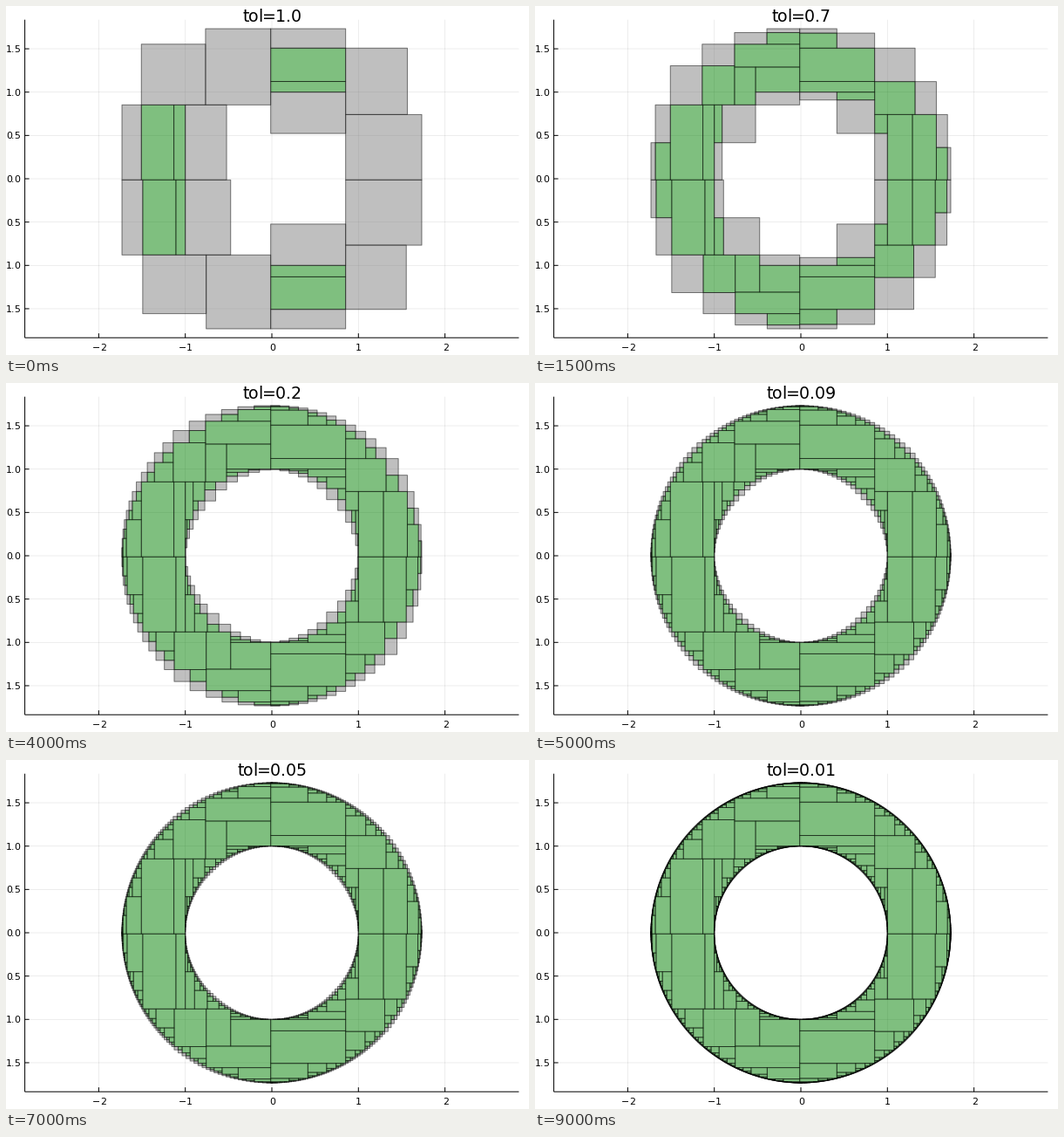
Write a matplotlib script that moves like this. It is 600x400 px and loops after 9.5 s.

```python
import math

import matplotlib.pyplot as plt
from matplotlib.animation import FuncAnimation
from matplotlib.collections import LineCollection, PolyCollection
from matplotlib.textpath import TextPath

W, H, DPI = 600, 400, 100
PX = 72 / DPI                      # one pixel in points
CX, CY, SCALE = 305, 198, 99.3     # centre of the plot and pixels per unit
LEFT, RIGHT, TOP, BOTTOM = 21.6, 588.4, 15.7, 380.2
R2_MIN, R2_MAX = 1, 3              # the ring 1 <= x^2 + y^2 <= 3
SPLIT = 127 / 256                  # bisection point of a box
TINY = 1e-7
GREEN, GRAY = (0, 0.5, 0, 0.5), (0.5, 0.5, 0.5, 0.5)

TOLS = [k / 10 for k in range(10, 0, -1)] + [k / 100 for k in range(9, 0, -1)]


# ---- interval paving of the ring; a box is (x interval, y interval) ----

def square(v):
    a, b = v[0] ** 2, v[1] ** 2
    return (0 if v[0] <= 0 <= v[1] else min(a, b)), max(a, b)


def root(v, lo, hi):
    """Hull of the part of v whose square lies in [lo, hi]."""
    if hi < 0 or lo > hi:
        return None
    a, b = math.sqrt(max(lo, 0)), math.sqrt(hi)
    parts = [(max(v[0], p), min(v[1], q)) for p, q in ((-b, -a), (a, b))]
    parts = [p for p in parts if p[0] <= p[1]]
    if not parts:
        return None
    return min(p[0] for p in parts), max(p[1] for p in parts)


def contract(box, lo, hi):
    """Shrink the box around the points with lo <= x^2 + y^2 <= hi."""
    x, y = box
    (xl, xh), (yl, yh) = square(x), square(y)
    lo, hi = max(lo, xl + yl), min(hi, xh + yh)
    if lo > hi:
        return None
    x, y = root(x, lo - yh, hi - yl), root(y, lo - xh, hi - xl)
    return (x, y) if x and y else None


def hull(a, b):
    if not a or not b:
        return a or b
    return tuple((min(u[0], v[0]), max(u[1], v[1])) for u, v in zip(a, b))


def intersect(a, b):
    if not a or not b:
        return None
    c = tuple((max(u[0], v[0]), min(u[1], v[1])) for u, v in zip(a, b))
    return c if all(v[0] <= v[1] for v in c) else None


def size(v):
    return v[1] - v[0]


def difference(box, cut):
    """Pieces of box outside cut: full-height x strips first, then y strips."""
    if not cut:
        return [box]
    (x, y), (cx, cy) = box, cut
    pieces = [((x[0], cx[0]), y), ((cx[1], x[1]), y),
              (cx, (y[0], cy[0])), (cx, (cy[1], y[1]))]
    return [p for p in pieces if size(p[0]) > TINY and size(p[1]) > TINY]


def bisect(box):
    x, y = box
    gap = size(x) - size(y)
    if gap > 1e-9 or (abs(gap) <= 1e-9 and x[1] > 0):
        m = x[0] + SPLIT * size(x)
        return [((x[0], m), y), ((m, x[1]), y)]
    m = y[0] + SPLIT * size(y)
    return [(x, (y[0], m)), (x, (m, y[1]))]


def pave(tol):
    inside, edge = [], []
    work = [((-2, 2), (-2, 2))]
    while work:
        box = work.pop()
        inner = contract(box, R2_MIN, R2_MAX)
        outer = hull(contract(box, -math.inf, R2_MIN),
                     contract(box, R2_MAX, math.inf))
        inside += difference(box, outer)
        rest = intersect(inner, outer)
        if not rest:
            continue
        widest = max(map(size, rest))
        if widest >= tol:
            work += bisect(rest)
        elif widest > TINY:
            edge.append(rest)
    return inside, edge


# ---- drawing ----

def px(x):
    return CX + SCALE * x


def py(y):
    return CY - SCALE * y


def corners(box):
    (x0, x1), (y0, y1) = box
    return [(px(x0), py(y0)), (px(x1), py(y0)),
            (px(x1), py(y1)), (px(x0), py(y1))]


def advance(char, em):
    """Whole-pixel pen advance of a glyph."""
    end = [TextPath((0, 0), s, size=100).get_extents().x1
           for s in (char + "|", "|")]
    return math.floor((end[0] - end[1]) * em / 100)


def label(s, x, y, em, align=0.5):
    """Set s glyph by glyph on whole pixels, baseline at y."""
    steps = [advance(c, em) for c in s]
    pen = round(x - align * sum(steps))
    glyphs = []
    for c, step in zip(s, steps):
        glyphs.append(ax.text(pen, y, c, fontsize=em * PX, family="DejaVu Sans",
                              color="black", va="baseline", ha="left"))
        pen += step
    return glyphs


def lines(segments, width, **style):
    ax.add_collection(LineCollection(segments, linewidths=width * PX,
                                     snap=False, **style))


fig = plt.figure(figsize=(W / DPI, H / DPI), dpi=DPI, facecolor="white")
ax = fig.add_axes([0, 0, 1, 1])
ax.set_xlim(0, W)
ax.set_ylim(H, 0)
ax.axis("off")

xticks = range(-2, 3)
yticks = [k / 2 for k in range(-3, 4)]
lines([[(px(x), TOP), (px(x), BOTTOM)] for x in xticks]
      + [[(LEFT, py(y)), (RIGHT, py(y))] for y in yticks],
      0.7, colors=[(0, 0, 0, 0.1)], zorder=1)
lines([[(LEFT, TOP), (LEFT, BOTTOM)], [(LEFT, BOTTOM), (RIGHT, BOTTOM)]]
      + [[(px(x), BOTTOM), (px(x), BOTTOM - 5)] for x in xticks]
      + [[(LEFT, py(y)), (LEFT + 5, py(y))] for y in yticks],
      1, colors="black", zorder=3)
for x in xticks:
    label(str(x).replace("-", "\u2212"), px(x), 395, 11)
for y in yticks:
    label(str(y).replace("-", "\u2212"), 15, round(py(y)) + 4, 11, align=1)

boxes = PolyCollection([], edgecolors=[(0, 0, 0, 0.5)], linewidths=PX,
                       snap=False, zorder=2)
ax.add_collection(boxes)

pavings = [pave(tol) for tol in TOLS]
titles = [label(f"tol={tol}", CX, 18, 19) for tol in TOLS]


def draw(i):
    inside, edge = pavings[i]
    boxes.set_verts([corners(b) for b in inside + edge])
    boxes.set_facecolors([GREEN] * len(inside) + [GRAY] * len(edge))
    for k, title in enumerate(titles):
        for glyph in title:
            glyph.set_visible(k == i)
    return [boxes]


anim = FuncAnimation(fig, draw, frames=len(TOLS), interval=500,
                     repeat=True, repeat_delay=0)
plt.show()
```
